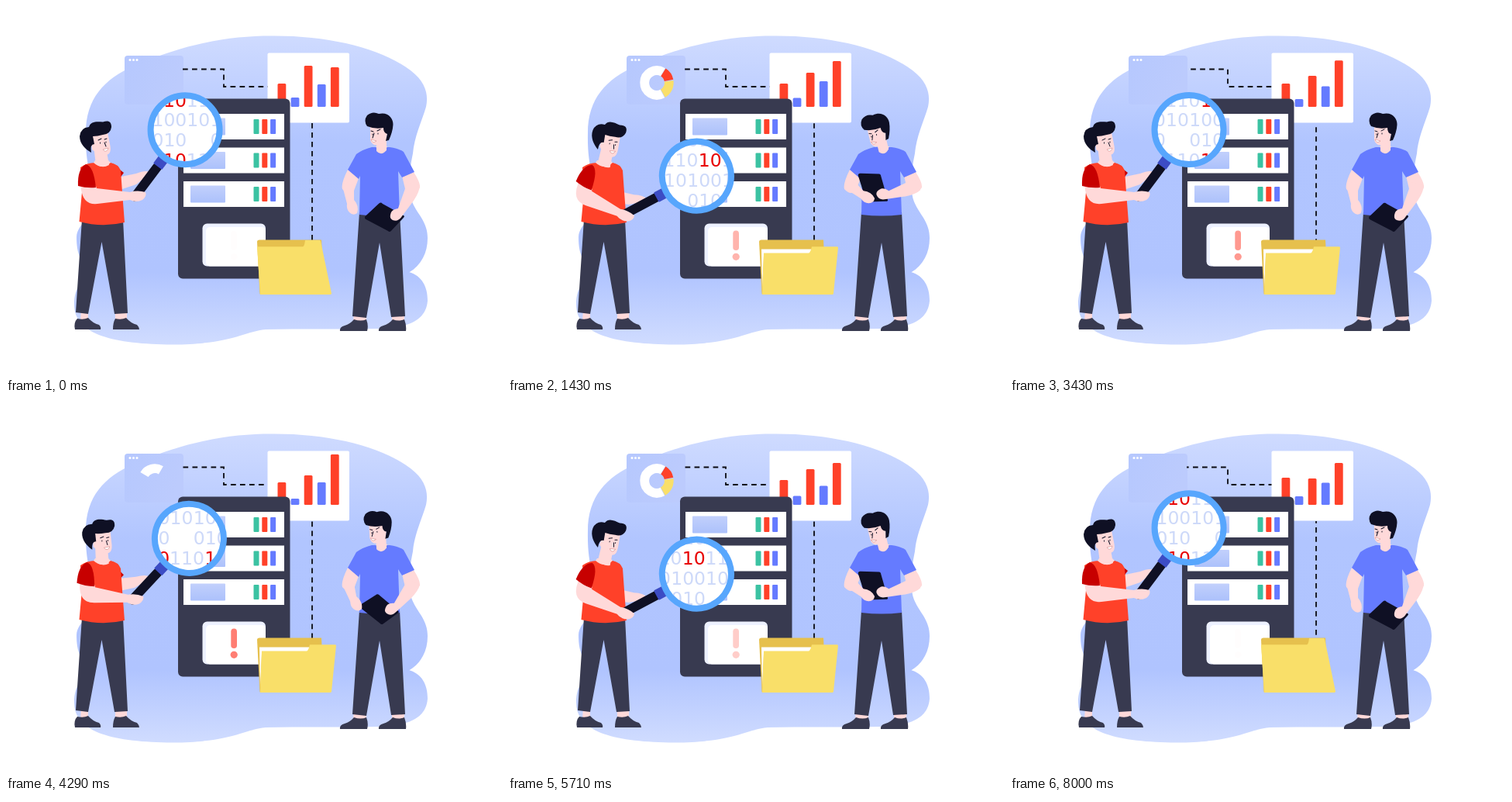
Write an HTML page that moves like this. It is 640 px wide and 477 px high and loops after 8.07 s.

```html
<!DOCTYPE html>
<html lang="en">
<head>
<meta charset="utf-8">
<title>Data analysis</title>
<style>
  html, body { margin: 0; width: 100%; height: 100%; overflow: hidden; background: #fff; }
  svg { display: block; width: 100%; height: 100%; }
  .code { font: 23.5px "DejaVu Sans", sans-serif; fill: #cdd9f9; }
  .code .hot { fill: #e80000; }
  .skin { fill: #ffd9d9; }
  .dark { fill: #383a50; }
  .ink { fill: #0f1024; }
  .dash { fill: none; stroke: #0b0b12; stroke-width: 1.8; stroke-dasharray: 6.7 5.3; }
  .face { fill: none; stroke: #15162a; stroke-width: 1; stroke-linecap: round; }
</style>
</head>
<body>
<svg viewBox="0 0 640 477">
  <defs>
    <linearGradient id="sky" x2="0" y2="1">
      <stop stop-color="#cfdbff"/><stop offset=".45" stop-color="#b1c5ff"/><stop offset="1" stop-color="#b0c4ff"/>
    </linearGradient>
    <linearGradient id="ground" x2="0" y2="1">
      <stop stop-color="#b0c4ff"/><stop offset="1" stop-color="#d0dcff"/>
    </linearGradient>
    <linearGradient id="pane" x2="1" y2=".25">
      <stop stop-color="#b6c8fe"/><stop offset="1" stop-color="#bccbfd"/>
    </linearGradient>
    <linearGradient id="label" x2="0" y2="1">
      <stop stop-color="#c2d0fc"/><stop offset="1" stop-color="#acc1fb"/>
    </linearGradient>
    <clipPath id="lens"><circle id="lensHole" r="41"/></clipPath>
  </defs>

  <path fill="url(#sky)" d="M117 343.500C96 336 91 318 91 298C92 276 124 268 119 246C112 228 102 208 103 164C103 120 126 94 166 77C236 46 296 38 346 38.500C420 38.500 484 55 522 83C543 99 545 116 542 130C536 150 527 168 525 190C521 210 520 220 521 238C522 264 544 272 544 299C544 318 536 334 520 343.500Z"/>
  <path fill="url(#ground)" d="M117 343H520C537 348 544 362 544 380C542 405 520 415 480 416C430 417 380 416 335 417C305 420 293 436 215 436.500C140 436 88 424 88 385C88 361 100 350 117 343Z"/>

  <rect x="153" y="64" width="76" height="63" rx="4" fill="url(#pane)"/>
  <g fill="#fff"><circle cx="160" cy="69.500" r="1.500"/><circle cx="164.500" cy="69.500" r="1.500"/><circle cx="169" cy="69.500" r="1.500"/></g>
  <g id="donut" fill="none" stroke-width="11.800"></g>

  <path class="dash" d="M228 81.500H281V104H338"/>
  <rect x="337.500" y="60.500" width="105.500" height="90" rx="2" fill="#fff"/>
  <g id="bars"></g>
  <path class="dash" d="M395 151V303"/>

  <rect class="dark" x="222" y="119.500" width="144.500" height="232" rx="6"/>
  <g id="slots"></g>
  <rect x="253.500" y="280.500" width="81.500" height="55" rx="6" fill="#edf1ff"/>
  <rect x="258" y="285" width="77" height="50.500" rx="5" fill="#fff"/>
  <g id="alert" fill="#ff4f40"><rect x="290.300" y="289.500" width="7.700" height="25.500" rx="3.800"/><circle cx="294.200" cy="323.300" r="4.600"/></g>

  <path fill="#e6c04d" d="M324 304Q324 301.500 327 301.500H407L408 320L330 371.500H327.500Z"/>
  <path id="paper" fill="#fff"/>
  <path id="folder" fill="#f9df69"/>

  <!-- analyst with the magnifier -->
  <g class="arm">
    <path class="skin" d="M144 221L168 216Q180 211 185 214L183 219Q175 224 168 230L150 236L140 236Z"/>
    <path fill="#c70000" d="M138 204L152 215L146 223L136 220Z"/>
  </g>
  <path class="skin" d="M97 392H106V406H96ZM141 392H156V406H141Z"/>
  <path class="dark" d="M98 275H151L157 396L140 397L123.500 304L106 397L90 395Z"/>
  <path class="dark" d="M89 417Q87 408 92 403Q100 405 106 402Q112 409 120 411Q123 414 122 417ZM138 417Q138 408 141 403Q149 405 155 402Q161 409 169 411Q172 414 172 417Z"/>
  <path fill="#ff4129" d="M96 208Q104 202 115 202H135Q145 204 148 212L150 240L153 279Q124 286 94.500 278L98 240Z"/>
  <path class="skin" d="M113 202Q124 212 135 202L132 199H115Z"/>
  <g id="analystHead">
    <path class="skin" d="M113 181L130 188L133 205Q124 210 116 204Z"/>
    <path class="skin" d="M109 167L131 163L134 178Q137 191 129 192Q119 192 111 185Z"/>
    <path class="ink" d="M110 189C103 185 95 178 95 168Q96 157 107 156C109 148 118 149 125 149.500C132 147 136 149 136 156Q135 165 125 166Q118 168 112 168L114 178Q108 178 110 189Z"/>
    <path class="face" d="M119 173l4-2M127 172l3-1M121.500 176v1M129 175v1M127 176l2 5"/>
    <path fill="#fff" stroke="#c77" stroke-width=".5" d="M125 185L132 183Q131 188 127 187Z"/>
  </g>
  <g class="arm">
    <g transform="translate(231 159.500) rotate(36.800)">
      <rect class="ink" x="-6" y="55" width="12" height="58.500" rx="5"/>
      <rect x="-7" y="46" width="14" height="13" rx="1" fill="#3c4cc4"/>
    </g>
    <circle cx="231" cy="159.500" r="44.500" fill="#fff"/>
  </g>
  <g clip-path="url(#lens)"><g id="code" class="code"></g></g>
  <g class="arm">
    <circle cx="231" cy="159.500" r="44.500" fill="none" stroke="#57a6fd" stroke-width="8"/>
    <path class="skin" d="M96 231L116 232L117 235L160 240Q170 237 180 240Q182 245 176 250Q168 254 160 250L118 255Q99 257 97 235Z"/>
    <path fill="#c70000" d="M93 232Q92 210 103 204Q113 206 116 234Q104 235 93 232Z"/>
  </g>

  <!-- colleague with the tablet -->
  <path class="skin" d="M449 394H465V408H448ZM498 394H514V408H498Z"/>
  <path class="dark" d="M456 266H508L515 400L497 401L482 305L465 402L447 400Z"/>
  <path class="dark" d="M431 419Q430 414 437 412Q444 410 449 404Q458 407 465 404Q468 412 466 419ZM481 419Q480 414 487 412Q494 410 499 404Q507 407 514 404Q517 412 516 419Z"/>
  <path class="skin" d="M441 211L455 222L449 238Q442 245 434 236Q432 229 441 211ZM511 219L526 214Q535 228 534 234Q528 244 516 240Z"/>
  <path fill="#657bff" d="M441 211L452 191Q460 185 472 182H495Q508 184 513 188L527 214L511 221L506 213L508 269Q482 272 456 269L457 219L455 223Z"/>
  <path class="skin" d="M477 181Q485 197 492 181Z"/>
  <g id="colleagueHead">
    <path class="skin" d="M478 170L491 166V186Q484 194 478 187Z"/>
    <path class="skin" d="M470 154H493L491 172Q482 181 475 179Q469 176 470 168Z"/>
    <path class="ink" d="M466 155Q461 148 466 141Q473 135 481 139C493 136 500 145 499.500 153Q499 162 494 173L490 174L492 165Q487 164 487 157Q476 159 466 155Z"/>
    <path class="face" d="M471 161l3 1M479 161l4-2M473 165v1M480 164v1M475 164l-2 6"/>
    <path fill="#fff" stroke="#c77" stroke-width=".5" d="M471 172L478 174Q473 178 471 172Z"/>
  </g>
  <g id="tabletArm">
    <path class="ink" d="M482 254Q484 253 486 255L513 270Q515 271 513 273L497 290Q495 292 493 290L464 275Q462 273 464 271Z"/>
    <path class="skin" d="M518 227L534 231Q534 239 526 251L511 271Q506 279 499 276Q494 274 497 266Q499 262 506 261Z"/>
  </g>
  <g id="freeArm">
    <path class="skin" d="M434 232Q440 222 449 233L449 250Q456 258 453 267Q448 271 443 266Q439 262 440 255Z"/>
  </g>
</svg>

<script>
const LOOP = 8070, CYCLE = 4000;
const $ = id => document.getElementById(id);

function add(parent, tag, attrs, text) {
  const node = document.createElementNS("http://www.w3.org/2000/svg", tag);
  for (const key in attrs) node.setAttribute(key, attrs[key]);
  if (text) node.textContent = text;
  parent.append(node);
  return node;
}

function ease(t, from, to) {
  const s = Math.min(1, Math.max(0, (t - from) / (to - from)));
  return s * s * (3 - 2 * s);
}

// server slots
for (const y of [139, 182.5, 226]) {
  add($("slots"), "rect", { x: 229, y, width: 130, height: 33, fill: "#fff" });
  add($("slots"), "rect", { x: 238, y: y + 5.5, width: 45, height: 22, rx: 1, fill: "url(#label)" });
  ["#3bc2a2", "#ff4129", "#657bff"].forEach((fill, i) =>
    add($("slots"), "rect", { x: 319.5 + 10.8 * i, y: y + 7, width: 7, height: 19, rx: 1, fill }));
}

// binary text: three repeating rows, each with a five-digit period
const ROWS = ["10110", "10010", "010"], PERIOD = 75;
for (let row = 0; row < 6; row++) {
  for (let k = -1; k < 3; k++) {
    const kind = row % 3, x = (kind ? 188.5 : 203) + PERIOD * k;
    const text = add($("code"), "text", { x, y: 129.5 + 25.8 * row }, kind ? ROWS[kind] : "");
    if (!kind) {
      add(text, "tspan", { class: "hot" }, ROWS[0].slice(0, 2));
      add(text, "tspan", {}, ROWS[0].slice(2));
    }
  }
}

// bar tops as [time, y] points
const SAMPLES = [0, 1430, 2570, 4290, 5710, 6710, 8000];
const sampled = tops => tops.map((y, i) => [SAMPLES[i], y]);
const BARS = [
  sampled([100, 100, 99, 101, 98, 93, 95]),
  sampled([118, 118.5, 118, 122, 118.5, 119, 119]),
  sampled([77, 86, 88, 92, 84, 78.5, 96]),
  sampled([101, 97, 106, 101, 105.5, 101.5, 101.5]),
  [[0, 79], [550, 72], [1000, 76], [1430, 71], [1600, 68], [2570, 84], [3150, 65],
   [3700, 75], [4290, 65], [5000, 80], [5710, 76], [6350, 69], [6710, 76.5], [7400, 69], [8000, 76]]
];
const bars = BARS.map((_, i) => add($("bars"), "rect",
  { x: 350.5 + 17.1 * i, width: 10.8, rx: 1.5, fill: i % 2 ? "#657bff" : "#ff4129" }));

function along(points, t) {
  const last = points.length - 1;
  if (t >= points[last][0]) return points[last][1];
  const i = points.findIndex(p => p[0] > t), [t0, y0] = points[i - 1], [t1, y1] = points[i];
  return y0 + (y1 - y0) * ease(t, t0, t1);
}

// donut slices run counter-clockwise; angles in degrees, times within a cycle
const SLICES = [
  { color: "#fff", from: 300, to: 62, grow: [0, 700], shrink: [2000, 2700] },
  { color: "#f9df69", from: 60, to: -8, grow: [600, 900], shrink: [2650, 3050] },
  { color: "#ff4129", from: -11, to: -58, grow: [800, 1100], shrink: [2900, 3350] }
].map(s => ({ ...s, path: add($("donut"), "path", { stroke: s.color }) }));

function arc(a, b) {
  const point = deg => {
    const r = deg * Math.PI / 180;
    return `${192 + 15.8 * Math.cos(r)} ${99 + 15.8 * Math.sin(r)}`;
  };
  return a - b < 0.5 ? "" : `M${point(a)}A15.8 15.8 0 ${a - b > 180 ? 1 : 0} 0 ${point(b)}`;
}

const turn = (node, deg, x, y) => node.setAttribute("transform", `rotate(${deg} ${x} ${y})`);
const arms = document.querySelectorAll(".arm"), dashes = document.querySelectorAll(".dash");

function draw(t) {
  const phase = Math.min(t, 2 * CYCLE) % CYCLE;
  const pose = ease(phase, -30, 970) - ease(phase, 1980, 2980);

  arms.forEach(arm => turn(arm, 25.2 * pose, 104, 217));
  const angle = 25.2 * pose * Math.PI / 180, c = Math.cos(angle), s = Math.sin(angle);
  $("lensHole").setAttribute("cx", 104 + 127 * c + 57.5 * s);
  $("lensHole").setAttribute("cy", 217 + 127 * s - 57.5 * c);
  turn($("analystHead"), 21 * pose, 124, 203);
  turn($("colleagueHead"), -13 * pose, 484, 185);
  turn($("tabletArm"), 45 * pose, 526, 232);
  turn($("freeArm"), -43 * pose, 439, 232);

  $("code").setAttribute("transform", `translate(${PERIOD * (1 - t / 1000 % 1)} 0)`);
  dashes.forEach(d => d.setAttribute("stroke-dashoffset", -0.0085 * t));
  $("alert").setAttribute("opacity", 1 - Math.abs(1 - t % 800 / 400));

  bars.forEach((bar, i) => {
    const y = along(BARS[i], t);
    bar.setAttribute("y", y);
    bar.setAttribute("height", 130 - y);
  });

  for (const { path, from, to, grow, shrink } of SLICES) {
    const span = from - to;
    path.setAttribute("d", arc(from - span * ease(phase, ...shrink), from - span * ease(phase, ...grow)));
  }

  const open = ease(t, 70, 900) - ease(t, 7000, 7800);
  const top = 302 + 8.3 * open, lip = top + 8.3, left = 324 + 6 * open, right = 406 + 20 * open;
  $("folder").setAttribute("d", `M328 372L${left} ${lip}H${383 + 5 * open}Q${385 + 5 * open} ${lip} ${386 + 6 * open} ${top}H${right - 1}L${right} ${top + 1}L420 370.5Q420 372 418 372Z`);
  $("paper").setAttribute("d", open > 0.05 ? `M328 367L${left - 3} ${lip - 5 * open}H${386 + 5 * open}V${lip + 4}H${left}Z` : "");
}

function frame(now) {
  draw(now % LOOP);
  requestAnimationFrame(frame);
}
draw(0);
requestAnimationFrame(frame);
</script>
</body>
</html>
```
